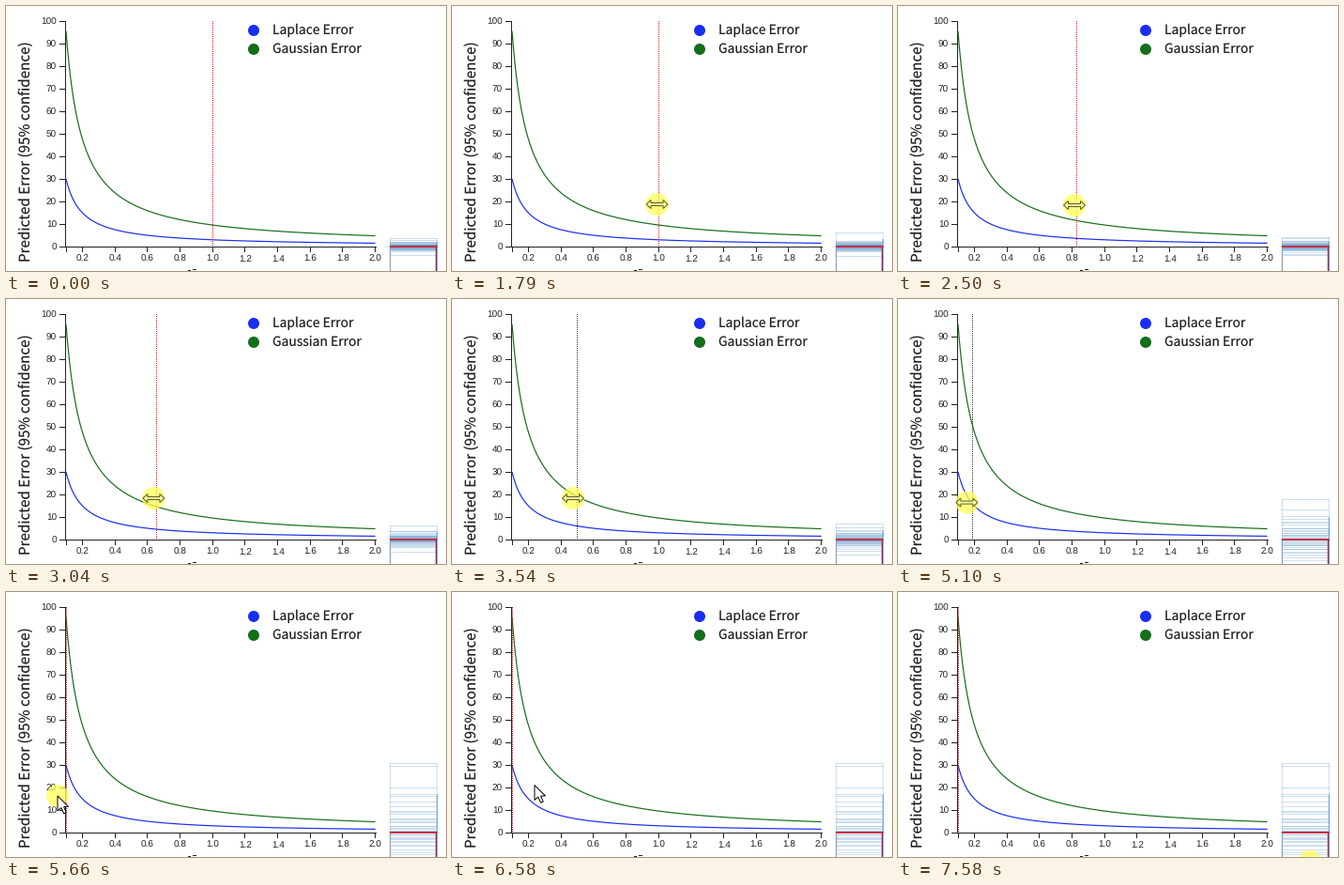
A matplotlib script for the animation above (7.64 s loop, 469 by 282 pixels).

```python
import numpy as np
import matplotlib.pyplot as plt
from matplotlib.animation import FuncAnimation
from matplotlib.collections import LineCollection
from matplotlib.patches import Circle, Polygon

plt.rcParams["path.snap"] = False
plt.rcParams["text.hinting"] = "none"

W, H, DPI = 469, 282, 64
PX = 72 / DPI                      # one pixel in points
LOOP, STEP = 7640, 20
LEFT, ZERO = 64, 256               # pixel place of epsilon 0.1 and error 0
X_UNIT, Y_UNIT = 173.5, 2.4        # pixels per unit
UI = ["Noto Sans CJK JP", "DejaVu Sans"]
INK = "#222222"
BLUE, GREEN = "#1a2ef0", "#146e1a"

DRAG_START, DRAG_END = 1640, 5600
RELEASE, CLICK = 6190, 7580
SHOW, HOVER = 330, 900

# Key points of the mouse (time, x, y) and of the dragged line (time, x)
MOUSE = [(SHOW, 241, 279), (980, 222, 211), (1250, 222, 211),
         (1310, 219, 211), (1770, 219, 211), (2500, 188, 212),
         (3540, 129, 212), (4380, 97, 216), (5660, 55, 217),
         (RELEASE, 33, 205), (6460, 36, 191), (6700, 140, 220),
         (7220, 443, 284), (CLICK, 439, 287)]
LINE = [(1770, 220.5), (2500, 190.5), (3540, 133.5), (4380, 100.5),
        (DRAG_END, 64.5)]

ARROW = np.array([(0, 0), (0, 16), (3.8, 12.6), (6.6, 18.8), (9.2, 17.6),
                  (6.6, 11.6), (11.5, 11.4)])
half = np.array([(-11.5, 0), (-6.5, -4.5), (-6.5, -1.5), (6.5, -1.5),
                 (6.5, -4.5)])
RESIZE = np.vstack([half, -half])


def to_x(eps):
    return LEFT + (eps - 0.1) * X_UNIT


def to_y(error):
    return ZERO - error * Y_UNIT


def crisp(v):
    return np.floor(v) + 0.5


def along(keys, t):
    times, *columns = zip(*keys)
    return [np.interp(t, times, column) for column in columns]


fig = plt.figure(figsize=(W / DPI, H / DPI), dpi=DPI, facecolor="white")
ax = fig.add_axes([0, 0, 1, 1])
ax.set_xlim(0, W)
ax.set_ylim(H, 0)
ax.axis("off")


def line(xs, ys, color=INK, width=1, **kw):
    kw.setdefault("solid_capstyle", "butt")
    return ax.plot(xs, ys, color=color, lw=width * PX, **kw)[0]


def label(x, y, text, size, family=UI, **kw):
    ax.text(x, y, text, fontsize=size * PX, family=family, color=INK,
            va="baseline", **kw)


def x_tick(x):
    line([crisp(x)] * 2, [ZERO, ZERO + 6])


def draw_chart():
    base = crisp(ZERO)
    line([63.5, 63.5], [16, ZERO + 1])
    line([63, 395], [base, base])
    for error in range(0, 101, 10):
        y = crisp(to_y(error))
        line([57, 63], [y, y])
        label(54, y + 3.4, str(error), 10, "Liberation Sans", ha="right")
    x_tick(LEFT)
    for eps in np.arange(1, 11) / 5:
        x_tick(to_x(eps))
        label(to_x(eps) + 0.3, 272.2, f"{eps:.1f}", 10, "Liberation Sans",
              ha="center")

    eps = np.linspace(0.1, 2, 400)
    line(to_x(eps), to_y(9.55 / eps), GREEN, 1.2)
    line(to_x(eps), to_y(3 / eps), BLUE, 1.2)

    for y, color, name in [(26, BLUE, "Laplace Error"),
                           (46, GREEN, "Gaussian Error")]:
        ax.add_patch(Circle((264, y), 6, fc=color, ec="none"))
        label(283.8, y + 4.3, name, 13.9)
    label(26, 272.5, "Predicted Error (95% confidence)", 15.2, rotation=90,
          rotation_mode="anchor", ha="left")
    # Top edge of the cut-off axis title
    line([194, 197], [281.5, 281.5])
    line([199, 203], [280.5, 280.5])


draw_chart()

marker = line([0, 0], [16, ZERO], ls=(0, (1, 1)), zorder=4)
noise = LineCollection([], colors="#4a8abf", lw=PX, alpha=0.28, zorder=3)
ax.add_collection(noise)
sides = [line([x, x], [ZERO, H], "#d3deec") for x in (409.5, 459.5)]
glow = line([459.5, 459.5], [ZERO, H], "#5b9ad0", zorder=3)
line([409.5, 409.5], [ZERO, H], "#8593b4", zorder=3)
line([409, 460], [ZERO, ZERO], "#c82f48", 2, zorder=4)
line([458.5, 458.5], [ZERO, H], "#b8284a", 1.3, zorder=4)
halo = ax.add_patch(Circle((0, 0), 12, fc="#ffff55", ec="none", alpha=0.75,
                           zorder=5))
pointer = ax.add_patch(Polygon(ARROW, lw=PX, zorder=6))


def draw_noise(t, eps, n=20):
    """Laplace noise of scale 1 / eps, drawn anew while dragging."""
    tick = int(np.clip(t, DRAG_START, DRAG_END)) // 60
    rng = np.random.default_rng(tick)
    u = (np.arange(n) + rng.random((2, n))) / n
    up, down = -np.log(1 - u) / eps
    rows = crisp(to_y(np.concatenate([up, -down])))
    noise.set_segments([[(409, y), (460, y)] for y in rows])
    top = rows.min()
    for side in sides:
        side.set_ydata([top, H])
    glow.set_ydata([0.45 * ZERO + 0.55 * top, H])


def draw_mouse(t):
    place = along(MOUSE, t)
    resizing = HOVER < t < DRAG_END
    pressed = DRAG_START <= t < RELEASE or t >= CLICK
    tinted = resizing and pressed
    halo.center = place
    halo.set_visible(pressed)
    pointer.set_xy((RESIZE if resizing else ARROW) + place)
    pointer.set_facecolor("#ffffa8" if tinted else "white")
    pointer.set_edgecolor("#5c5c20" if tinted else "black")
    pointer.set_visible(t >= SHOW)


def update(i):
    t = i * STEP
    x = crisp(along(LINE, t)[0])
    marker.set_xdata([x, x])
    # The line shows red on even pixel columns, dark on odd ones
    marker.set_color("#303030" if int(x) % 2 else "#f01010")
    draw_noise(t, max(0.1, 0.1 + (x - LEFT - 0.5) / X_UNIT))
    draw_mouse(t)
    return []


anim = FuncAnimation(fig, update, frames=LOOP // STEP, interval=STEP,
                     init_func=lambda: update(0), repeat=True,
                     repeat_delay=0)
plt.show()
```
